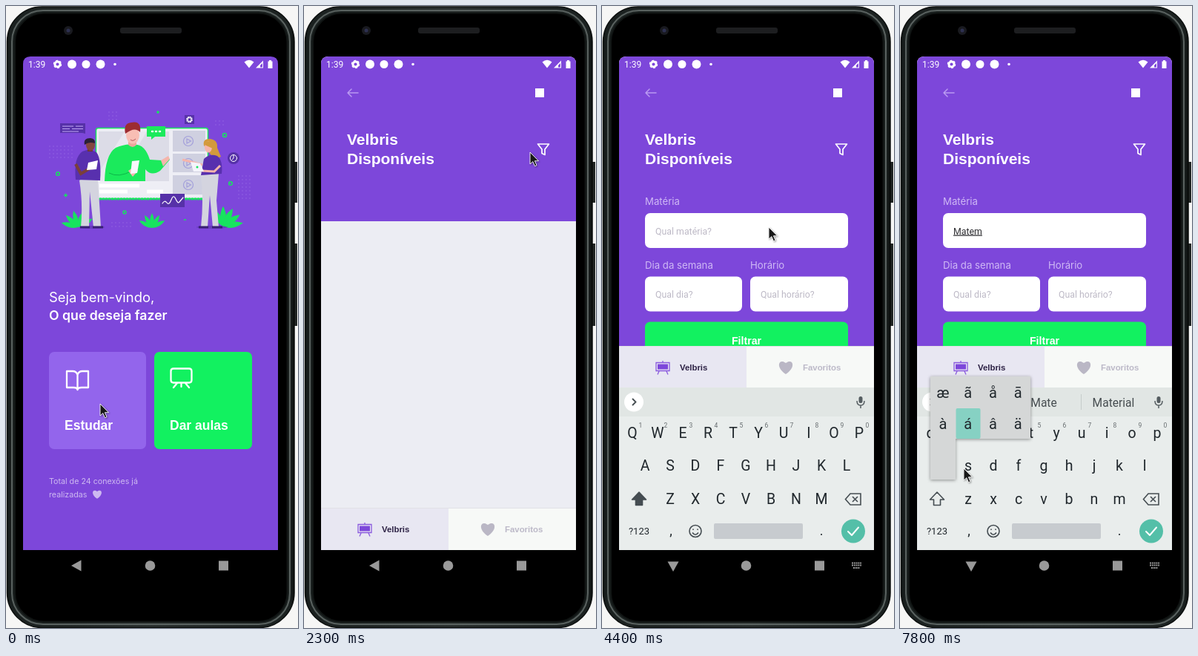
Recreate the animation shown at these times as an HTML page. Size 394x838 px, loop 8 s.

```html
<!DOCTYPE html>
<html lang="pt">
<head>
<meta charset="utf-8">
<title>Phone app</title>
<style>
html, body { margin: 0; width: 100%; height: 100%; overflow: hidden; background: #f6f6f5; }
svg { display: block; width: 394px; height: 838px; }
text { white-space: pre; }
.head { font: bold 21px "Liberation Sans", Arial, sans-serif; fill: #fff; }
.btn { font: bold 17.5px "Liberation Sans", Arial, sans-serif; fill: #fff; }
.tab { font: bold 11.4px "Liberation Sans", Arial, sans-serif; }
.inter { font-family: Inter, sans-serif; fill: #fff; }
.label { font: 13.2px Inter, sans-serif; fill: #cfb9f5; }
.input { font: 12.35px Roboto, sans-serif; fill: #bdb9c6; }
.kb { font-family: Roboto, sans-serif; fill: #20272c; text-anchor: middle; }
.line { fill: none; stroke: #fff; stroke-linecap: round; stroke-linejoin: round; }
#popup { filter: drop-shadow(0 1px 2px #0006); }
#cursor { filter: drop-shadow(1px 1px 1px #0006); }
</style>
</head>
<body>
<svg viewBox="0 0 394 838">
<defs>
  <clipPath id="screen"><path d="M23 733V78Q23 68 33 68H357Q367 68 367 78V733Z"/></clipPath>
  <clipPath id="glass"><path d="M23 68H367V775H23Z"/></clipPath>
  <clipPath id="reveal"><rect id="revealBox" x="23" y="68" width="344" height="665"/></clipPath>
  <path id="leaf" d="M0 0Q-6 -10 0 -21Q6 -10 0 0Z"/>
  <path id="heart" d="M0 9C-15 -1 -9 -13 0 -6C9 -13 15 -1 0 9Z"/>
  <g id="play" fill="none" stroke="#a39fda" stroke-width="1.2"><circle r="6.5"/><path d="M-2 -3L3.5 0L-2 3Z"/></g>
  <linearGradient id="rim" x2="1" y2="0">
    <stop offset="0" stop-color="#111615"/><stop offset=".012" stop-color="#1a201f"/>
    <stop offset=".5" stop-color="#2b3130"/><stop offset=".988" stop-color="#1a201f"/><stop offset="1" stop-color="#0a0d0c"/>
  </linearGradient>
</defs>

<!-- phone body -->
<path d="M389 210h4v55h-4zM389 320h4v111h-4z" fill="#202423"/>
<rect x="1.5" y="1" width="387.5" height="836.5" rx="47" fill="url(#rim)" stroke="#0b0e0d" stroke-width="1.5"/>
<rect x="8" y="6" width="375" height="827" rx="42" fill="none" stroke="#59615f" stroke-width="2"/>
<rect x="12" y="9.500" width="367.500" height="820" rx="39" stroke="#101413" stroke-width="2"/>
<rect x="154" y="29" width="83" height="8" rx="3" fill="#1d1e20"/>
<circle cx="84" cy="33" r="6" fill="#191a1f"/><circle cx="84" cy="33" r="2.500" fill="#2d3050"/>

<g clip-path="url(#screen)">
  <!-- welcome screen -->
  <g id="home">
    <path d="M23 60H367V780H23Z" fill="#7d47da"/>
    <g id="dots" fill="#9569e4"></g>
    <g id="plants" fill="#17e45f"></g>
    <g fill="#5a34ac" opacity=".6"><ellipse cx="116" cy="298" rx="17" ry="2"/><ellipse cx="278" cy="298" rx="21" ry="2"/></g>

    <rect x="121.500" y="164.500" width="151" height="95" rx="3" fill="#eeeef5" stroke="#17e45f" stroke-width="1.500"/>
    <path d="M122 260H272" stroke="#17e45f" stroke-width="3" stroke-dasharray="3 1"/>
    <path d="M125 169H220V236H125Z" fill="#dcdce7"/>
    <path d="M160 169H190L150 236H125V225Z" fill="#e8e8f0"/>
    <path d="M126 242H180M126 250H164M190 250H212" stroke="#fff" stroke-width="5"/>
    <path d="M225 168H269V196H225ZM225 199H269V224H225ZM225 228H269V254H225Z" fill="#cfd0e0"/>
    <use href="#play" x="246" y="182"/><use href="#play" x="246" y="212"/><use href="#play" x="246" y="241"/>

    <!-- presenter -->
    <path d="M133 236Q134 200 148 191Q162 185 172 187Q187 185 194 207L211 208L218 203L221 207L208 222Q196 230 188 220V236Z" fill="#1bea5c"/>
    <path d="M209 208L219 202L221 206L212 216Z" fill="#f5b5ac"/>
    <path d="M165 180H176V187Q171 193 165 187Z" fill="#eda69d"/>
    <ellipse cx="171" cy="174" rx="9" ry="11.500" fill="#f8beb4"/>
    <path d="M161 172Q158 158 169 157Q183 154 181 170Q174 162 161 172Z" fill="#9c2c31"/>
    <path d="M168 180Q171 183 175 179" fill="none" stroke="#b4555b"/>
    <path d="M139 225Q152 232 170 222" fill="none" stroke="#0db649"/>
    <path d="M165 222L174 216L178 222L171 230Z" fill="#f5b5ac"/>
    <path d="M170 209L180 208L177 225L168 226Z" fill="#f7f7fc"/>

    <!-- student on the left -->
    <path d="M102 233H124L128 298H118L113 250L112 298H101Q104 265 99 235Z" fill="#d4d4df"/>
    <path d="M94 234Q91 204 103 196L112 193L122 197Q129 206 127 235Z" fill="#5830ae"/>
    <path d="M94 213L101 226L116 217" fill="none" stroke="#7a3f3a" stroke-width="4"/>
    <path d="M110 190h7v6h-7z" fill="#71362f"/><ellipse cx="114" cy="187" rx="6" ry="8" fill="#834640"/>
    <path d="M106 187Q104 178 114 178Q121 179 120 185Q112 182 106 187Z" fill="#2a2036"/>
    <path d="M111 211L124 208L122 220L109 221Z" fill="#fff"/>
    <path d="M100 298h13M117 298h14" stroke="#382074" stroke-width="3"/>

    <!-- student on the right -->
    <path d="M265 226H287L284 262L287 298H279L275 255L272 298H263Q267 262 263 230Z" fill="#d4d4df"/>
    <path d="M267 188Q265 179 275 179Q286 180 285 191L290 203Q282 207 277 201Z" fill="#d39a3c"/>
    <path d="M263 228L267 206Q275 198 285 202Q293 208 291 226Z" fill="#5830ae"/>
    <ellipse cx="273" cy="190" rx="5" ry="7.500" fill="#f5b5ac"/><path d="M268 187Q270 180 279 184L279 192Z" fill="#d39a3c"/>
    <path d="M238 207L250 210L265 214M289 215L281 223L264 222" fill="none" stroke="#f5b5ac" stroke-width="3"/>
    <path d="M249 210L262 212L267 223H253Z" fill="#f4f4fb"/><circle cx="258" cy="217" r="1.500" fill="#17e45f"/>
    <path d="M260 298h13M278 298h14" stroke="#382074" stroke-width="3"/>

    <!-- floating badges -->
    <path d="M73 158H107V172L103 171H73ZM241 147H254V159H241ZM208 253H241V271H208Z" fill="#5631a8"/>
    <path d="M76 162H91M94 162H104M76 165.500H86M89 165.500H104M76 169H98" stroke="#c0a7f4"/>
    <circle cx="247.500" cy="153" r="3" fill="none" stroke="#fff" stroke-width="2.500" stroke-dasharray="1.800 .5"/>
    <path class="line" d="M211 266Q214 261 217 265T223 261T229 260T234 264L239 258" stroke-width="1.200"/>
    <path d="M190 162H215V176H201L196 180V176H190Z" fill="#1bea5c"/>
    <path d="M197 169h1m4 0h1m4 0h1" class="line" stroke-width="2.500"/>
    <circle cx="307" cy="205" r="8" fill="#5631a8"/><path class="line" d="M307 201V205L305 207" stroke-width="1"/><circle class="line" cx="307" cy="205" r="4.500"/>
    <g fill="none" stroke="#17e45f" stroke-width="1.500"><circle cx="295" cy="174" r="2.500"/><circle cx="70" cy="226" r="2.300"/><circle cx="303" cy="239" r="2.300"/><circle cx="160" cy="278" r="2"/><path d="M203 143h4M205 141v4M78 255h5M80.500 252.500v5M240 288h3"/></g>

    <text class="inter" x="58" y="398.500" font-size="18.400">Seja bem-vindo,</text>
    <text class="inter" x="58" y="423" font-size="17.700" font-weight="600">O que deseja fazer</text>
    <rect x="58" y="466" width="131" height="131" rx="7" fill="#9365ec"/>
    <rect x="200" y="466" width="132" height="131" rx="7" fill="#12f160"/>
    <path class="line" stroke-width="2.300" d="M96.500 497V517M96.500 497Q95 492 90 492H82V514H91Q96 514 96.500 517Q97 514 102 514H111V492H103Q98 492 96.500 497"/>
    <path class="line" stroke-width="2.300" d="M226 488.500H247Q250.500 488.500 250.500 492V504Q250.500 507.500 247 507.500H226Q222.500 507.500 222.500 504V492Q222.500 488.500 226 488.500ZM231 508L226 514M242 508L247 514M236.500 508V513"/>
    <text class="btn" x="79" y="571">Estudar</text><text class="btn" x="221" y="571">Dar aulas</text>
    <g opacity=".62"><text class="inter" font-size="10.700" x="58" y="644">Total de 24 conexões já</text>
      <text class="inter" font-size="10.700" x="58" y="661.500">realizadas</text>
      <use href="#heart" fill="#fff" transform="translate(123 658) scale(.65)"/></g>
  </g>
  <path id="dim" d="M23 60H367V733H23Z"/>

  <!-- list screen -->
  <g clip-path="url(#reveal)"><g id="list">
    <path d="M23 68H367V740H23Z" fill="#ecedf3"/>
    <rect id="header" x="23" y="68" width="344" fill="#7d47da"/>
    <path class="line" d="M73 117H59M64 112L59 117L64 122" style="stroke:#b999f1" stroke-width="1.500"/>
    <rect x="312" y="111" width="12" height="12" fill="#fff"/>
    <text class="head" x="58" y="187">Velbris</text><text class="head" x="58" y="213">Disponíveis</text>
    <path class="line" stroke-width="1.700" d="M315.500 186H330.500L325 193V200.500L321 198.500V193Z"/>
    <g id="form">
      <text class="label" x="58" y="268">Matéria</text>
      <text class="label" x="58" y="354">Dia da semana</text><text class="label" x="200" y="354">Horário</text>
      <g fill="#fff"><rect x="58" y="279" width="274" height="47" rx="7"/><rect x="58" y="364.500" width="131" height="47" rx="7"/><rect x="200" y="364.500" width="132" height="47" rx="7"/></g>
      <text class="input" id="field" x="72" y="307.500"></text>
      <text class="input" x="72" y="393">Qual dia?</text><text class="input" x="214" y="393">Qual horário?</text>
      <rect id="caret" y="294" width="1.600" height="17" fill="#2b8f77"/>
      <rect x="58" y="425.500" width="274" height="49" rx="7" fill="#12f160"/>
      <text class="btn" x="195" y="456" text-anchor="middle" style="font-size:14.200px">Filtrar</text>
    </g>
    <g id="tabs">
      <path d="M23 677H367V960H23Z" fill="#fdfefd"/>
      <path d="M23 677H195V733H23Z" fill="#e8e7f2"/><path d="M195 677H367V733H195Z" fill="#f7f9f7"/>
      <path d="M23 676.500H367" stroke="#e1e1e6"/>
      <path d="M73 698.500H91V709.500H73ZM82 696V698M77 710L75 714.500M87 710L89 714.500" fill="none" stroke="#8a5ade" stroke-width="1.300"/>
      <path d="M75 700.500H89V707.500H75Z" fill="#7d47da"/>
      <text class="tab" x="105" y="709" fill="#2d2245">Velbris</text>
      <use href="#heart" x="248" y="705" fill="#bab7c5"/>
      <text class="tab" x="271" y="709" fill="#bcb9c8">Favoritos</text>
    </g>
  </g></g>
</g>

<!-- status bar -->
<text x="30" y="83" style="font:12px Roboto,sans-serif" fill="#fff">1:39</text>
<g fill="#fff">
  <circle cx="69.500" cy="78.500" r="3.600" fill="none" stroke="#fff" stroke-width="3"/>
  <circle cx="69.500" cy="78.500" r="5" fill="none" stroke="#fff" stroke-width="1.500" stroke-dasharray="2.600"/>
  <circle cx="89" cy="78.500" r="6"/><circle cx="108" cy="78.500" r="5.500"/><circle cx="127.500" cy="78.500" r="6"/><circle cx="147" cy="78.500" r="1.800"/>
  <path d="M321.500 75.500Q328 70 334.500 75.500L328 83.500ZM337 83.500L347 73.500V83.500ZM353.500 74.500H355V73H358V74.500H359.500V84H353.500Z"/>
</g>
<path d="M343 80L346 77V82.500H343Z" fill="#7d47da"/>

<!-- keyboard -->
<g clip-path="url(#glass)"><g id="keyboard">
  <path d="M23 514H367V733H23Z" fill="#e9edec"/><path d="M23 514H367V553H23Z" fill="#e1e6e4"/>
  <circle cx="43" cy="533.500" r="13" fill="#fff"/>
  <path d="M41 529L45.500 533.500L41 538" fill="none" stroke="#444c50" stroke-width="1.800"/>
  <path id="bars" d="M144.500 523V544M244.500 523V544" stroke="#c6cccb"/>
  <g id="words"></g>
  <rect x="346.500" y="526" width="5" height="9" rx="2.500" fill="#555d61"/>
  <path d="M344 532Q344 538 349 538T354 532M349 538V542" fill="none" stroke="#555d61" stroke-width="1.500"/>
  <g id="keys"></g>
  <path id="shift" d="M50 655L59.500 665H54.500V672.500H45.500V665H40.500Z" stroke="#454d52" stroke-width="1.600" stroke-linejoin="round"/>
  <path d="M335 657H349V672H335L328.500 664.500ZM338 661L345 668M345 661L338 668" fill="none" stroke="#454d52" stroke-width="1.600"/>
  <text class="kb" x="50" y="712" font-size="13">?123</text><text class="kb" x="93" y="713" font-size="18">,</text><text class="kb" x="296" y="713" font-size="18">.</text>
  <g fill="none" stroke="#454d52" stroke-width="1.600"><circle cx="126" cy="707.500" r="8"/><path d="M122 709.500Q126 715 130 709.500M123 704.500v1.500M129 704.500v1.500"/></g>
  <rect x="151" y="697" width="120" height="21" rx="2" fill="#c7cbcf"/>
  <circle cx="339" cy="707.500" r="16" fill="#54bfa8"/><path class="line" d="M332 708L337 713L346 702.500" stroke-width="2"/>
</g></g>

<g id="popup">
  <path id="balloon" fill="#d5d7d7"/>
  <rect id="pick" y="542" width="33" height="41" rx="2" fill="#86d1c3"/>
  <g id="accents"></g>
</g>

<!-- navigation bar -->
<g fill="#fff" opacity=".6">
  <path id="back" d="M88 754L101.500 746.500V761.500Z"/><circle cx="194.500" cy="754" r="6.800"/><path d="M287 747.500H300V760.500H287Z"/>
  <path id="imeIcon" d="M337 750.500H350M337 753.500H350M339 757H348" stroke="#fff" stroke-width="2" stroke-dasharray="2 .8"/>
</g>
<path id="cursor" d="M0 0V16L3.800 12.600L6.500 18.800L9 17.700L6.400 11.700H11.500Z" fill="#181818" stroke="#fff" stroke-width=".9"/>
</svg>

<script>
const $ = id => document.getElementById(id);
const show = (id, on) => $(id).style.display = on ? '' : 'none';
const clamp = v => Math.max(0, Math.min(1, v));
const letter = (x, y, size, s, extra = '') => `<text class="kb" x="${x}" y="${y}" font-size="${size}" ${extra}>${s}</text>`;

// scenery: columns and rows of dots, fans of leaves
const grid = (x, y, cols, rows, gap = 5) => {
  for (let i = 0; i < cols * rows; i++)
    $('dots').innerHTML += `<circle cx="${x + i % cols * gap}" cy="${y + Math.floor(i / cols) * gap}" r=".7"/>`;
};
grid(59, 189, 7, 4); grid(139, 143, 3, 3); grid(314, 229, 4, 7); grid(283, 155, 3, 2); grid(143, 292, 6, 2);

const plant = (x, y, size, angles) => angles.forEach(a =>
  $('plants').innerHTML += `<use href="#leaf" transform="translate(${x} ${y}) rotate(${a}) scale(${size})"/>`);
plant(97, 298, 1.1, [-75, -45, -15, 20, 60]);
plant(197, 299, 0.95, [-60, -30, 0, 30, 60]);
plant(293, 297, 1.3, [-30, 0, 28, 55, 80]);

let keys = '';
[['qwertyuiop', 41, 582], ['asdfghjkl', 58, 626], ['zxcvbnm', 92, 671]].forEach(([row, x, y], r) =>
  [...row].forEach((c, i) => {
    keys += letter(x + i * 34, y, 19.5, c, 'data-key');
    if (!r) keys += letter(x + 11 + i * 34, y - 14, 8.5, (i + 1) % 10, 'opacity=".65"');
  }));
$('keys').innerHTML = keys;
const keyLabels = [...document.querySelectorAll('[data-key]')];

const pointer = [
  [0, 127, 536], [200, 127, 551], [300, 127, 551], [400, 118, 545], [800, 118, 545], [1100, 140, 352],
  [1400, 152, 306], [1600, 376, 192], [1700, 376, 192], [2000, 311, 195], [2200, 311, 195], [2300, 305, 197],
  [2500, 325, 183], [2600, 325, 183], [2700, 328, 180], [2800, 328, 180], [3000, 327, 186], [3300, 327, 186],
  [3700, 205, 313], [4100, 205, 313], [4400, 225, 298], [6300, 225, 298], [7000, 58, 633], [7600, 58, 633],
  [7800, 86, 623], [8000, 86, 623]];
function pointerAt(t) {
  const i = pointer.findIndex(p => p[0] > t);
  const [a, b] = [pointer[i - 1], pointer[i]];
  const k = (t - a[0]) / (b[0] - a[0]);
  return [a[1] + (b[1] - a[1]) * k, a[2] + (b[2] - a[2]) * k];
}

// start time, typed text, suggestions
const typing = [
  [3900, '', []], [4800, 'M', ['M', 'My', 'Me']], [5000, 'Ma', ['Ma', 'May', 'Make']],
  [5400, 'Mat', ['Mat', 'Math', 'Match']], [5600, 'Mate', ['Mate', 'Material', 'Materials']],
  [6000, 'Matem', ['Matem', 'Mate', 'Material']]];

// cubic-bezier(.208, .82, .25, 1)
function ease(x) {
  const curve = (s, a, b) => 3 * (1 - s) ** 2 * s * a + 3 * (1 - s) * s * s * b + s ** 3;
  let lo = 0, hi = 1;
  for (let i = 0; i < 25; i++) {
    const mid = (lo + hi) / 2;
    curve(mid, .208, .25) < x ? lo = mid : hi = mid;
  }
  return curve(lo, .82, 1);
}

function draw(t) {
  const open = t < 935 ? 0 : t >= 1360 ? 1 : ease((t - 935) / 425);
  const rest = 665 * (1 - open);
  $('home').setAttribute('transform', `translate(0 ${-13.3 * open})`);
  $('dim').setAttribute('opacity', .1 * open);
  $('revealBox').setAttribute('y', 68 + rest);
  $('list').setAttribute('transform', `translate(0 ${.041 * rest})`);

  const formOpen = t >= 3300;
  $('header').setAttribute('height', formOpen ? 463 : 222);
  show('form', formOpen);

  const [since, typed, words] = typing.findLast(e => e[0] <= t) || [Infinity, '', []];
  const field = $('field');
  field.textContent = typed || 'Qual matéria?';
  field.style.fill = typed ? '#2c2c30' : '';
  field.style.textDecoration = typed ? 'underline' : '';
  show('caret', t >= since && Math.floor((t - since) / 500) % 2 === 0);
  $('caret').setAttribute('x', 71.8 + (typed && formOpen ? field.getComputedTextLength() : 0));

  const rise = clamp((t - 4000) / 200);
  const resized = t >= 4000;
  $('tabs').setAttribute('transform', `translate(0 ${resized ? -218 : 0})`);
  $('keyboard').setAttribute('transform', `translate(0 ${140 * (1 - rise)})`);
  $('keyboard').setAttribute('opacity', rise);
  $('back').setAttribute('transform', `rotate(${-90 * clamp((t - 4000) / 300)} 96 754)`);
  show('imeIcon', resized);
  keyLabels.forEach(k => k.textContent = typed ? k.textContent.toLowerCase() : k.textContent.toUpperCase());
  $('shift').setAttribute('fill', typed ? 'none' : '#454d52');
  show('bars', typed);
  $('words').innerHTML = words.map((w, i) => letter([99, 194, 288][i], 540, 15.6, w, 'opacity=".8"')).join('');

  const [x, y] = pointerAt(t);
  $('cursor').setAttribute('transform', `translate(${x} ${y})`);

  // long press on "a": key preview, then accents
  const accents = t >= 7500;
  show('popup', t >= 7200);
  show('pick', accents);
  $('pick').setAttribute('x', x > 75 ? 75.5 : 41.5);
  $('balloon').setAttribute('d', accents ? 'M41 499H176V583H75V638H41Z' : 'M41 541H75V638H41Z');
  $('accents').innerHTML = accents
    ? [...'æãåāàáâä'].map((c, i) => letter(58 + i % 4 * 33.7, i < 4 ? 528 : 570, 20, c)).join('')
    : letter(58, 570, 20, 'a');
}

// the picture advances ten times a second
const start = performance.now();
function tick() {
  const t = Math.max(0, performance.now() - start) % 8000;
  draw(Math.floor(t / 100) * 100);
  requestAnimationFrame(tick);
}
tick();
</script>
</body>
</html>
```
